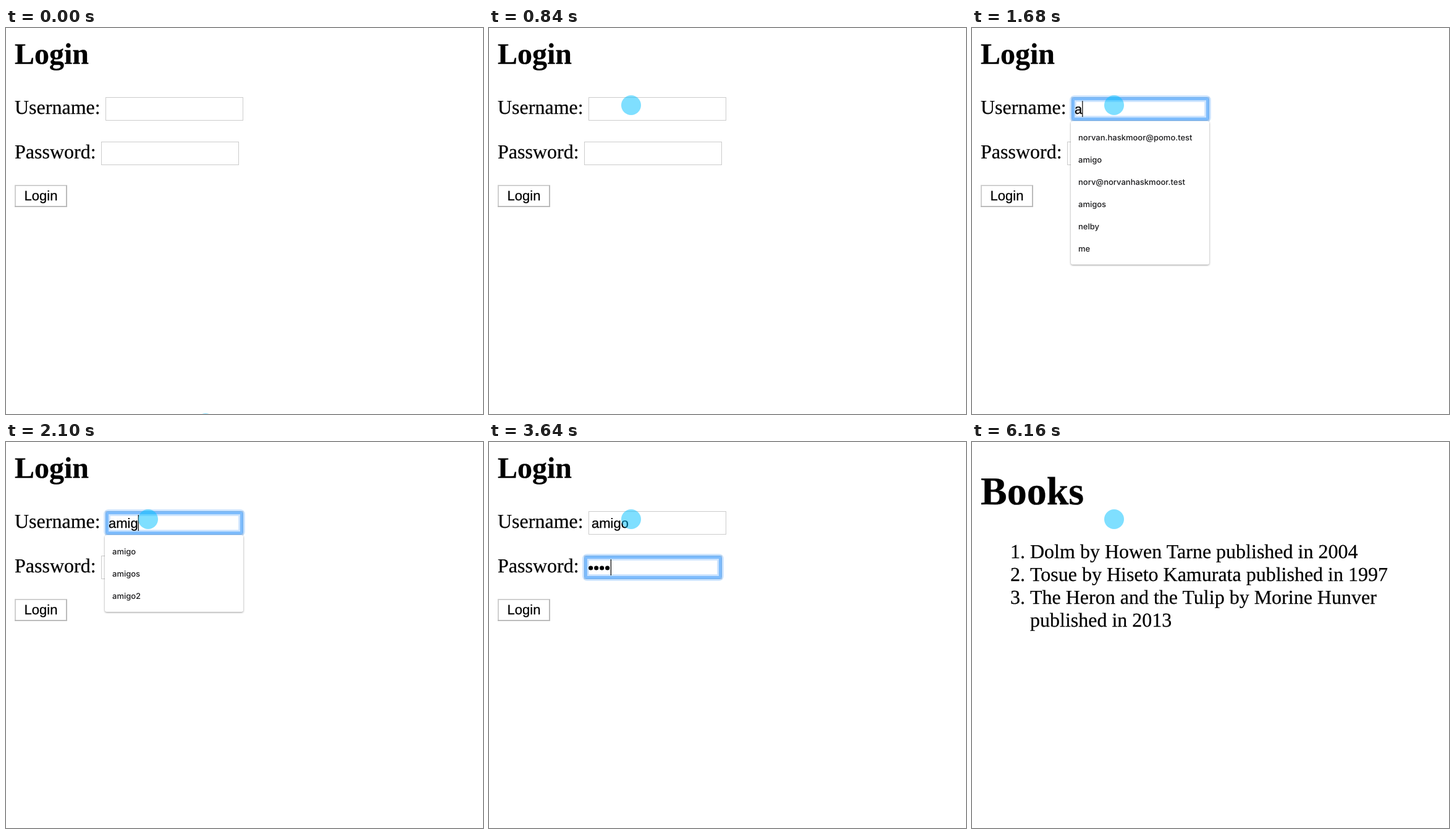
Write an HTML page that moves like this. It is 772 by 625 pixels and loops after 8 s.

```html
<!DOCTYPE html>
<html lang="en">
<head>
<meta charset="utf-8">
<title>Login</title>
<style>
  html, body { margin: 0; width: 100%; height: 100%; overflow: hidden; background: #fff; }
  svg { display: block; width: 772px; height: 625px; }
  text { white-space: pre; text-rendering: geometricPrecision; stroke: #000; stroke-width: .25px; }
  .serif { font: 32px "Liberation Serif", "Times New Roman", serif; }
  .bold { font-weight: 700; }
  .field { font: 22px "Liberation Sans", Arial, sans-serif; }
  .menu { font: 500 13px Inter, sans-serif; fill: #1c1c1e; stroke: none; }
  .input { fill: #fff; stroke: #ccc; }
  .ring rect { fill: none; stroke: #3b99fc; }
  #panel { fill: #fff; filter: drop-shadow(0 1px 1.5px rgba(0, 0, 0, .4)); }
</style>
</head>
<body>
<svg viewBox="0 0 772 625">
  <g id="login">
    <text class="serif bold" x="14" y="58" style="font-size:48px">Login</text>
    <text class="serif" x="14" y="139">Username:</text>
    <text class="serif" x="14" y="211">Password:</text>
    <rect class="input" x="161.5" y="112.5" width="222" height="37"/>
    <rect class="input" x="154.5" y="184.5" width="222" height="37"/>
    <rect x="15" y="255" width="83" height="34" fill="#fff" stroke="#d0d0d0" stroke-width="2"/>
    <path d="M14 289H99M98 255V290" stroke="#bbb" stroke-width="2"/>
    <text class="field" x="56.5" y="279" text-anchor="middle">Login</text>
    <g id="rings"></g>
    <text id="user" class="field" x="166" y="139"></text>
    <g id="dots"></g>
    <rect id="caret" width="1.2" height="26"/>
    <g id="menu">
      <rect id="panel" x="160" y="151" width="224" rx="3"/>
      <g id="items"></g>
    </g>
  </g>
  <g id="books">
    <text class="serif bold" x="14" y="101" style="font-size:64px">Books</text>
    <g id="list"></g>
  </g>
  <circle id="pointer" r="16" fill="#00bfff" fill-opacity=".5"/>
</svg>
<script>
const LOOP = 8000, STEP = 140;
const $ = id => document.getElementById(id);

function add(parent, tag, attrs, text = '') {
  const node = document.createElementNS('http://www.w3.org/2000/svg', tag);
  for (const key in attrs) node.setAttribute(key, attrs[key]);
  node.textContent = text;
  return parent.appendChild(node);
}
const show = (node, on) => { node.style.display = on ? '' : 'none'; };

// The last entry whose start time has passed.
const at = (table, t) => table.findLast(row => row[0] <= t)[1];

function makeRing(x, y, width, height) {
  const group = add($('rings'), 'g', { class: 'ring' });
  const box = { x, y, width, height, rx: 2 };
  add(group, 'rect', { ...box, 'stroke-width': 10.5, 'stroke-opacity': .27 });
  add(group, 'rect', { ...box, 'stroke-width': 5, 'stroke-opacity': .52 });
  return group;
}
const rings = {
  user: makeRing(163.5, 114.5, 218, 33),
  pass: makeRing(156.5, 186.5, 218, 33),
  button: makeRing(12.5, 252.5, 88, 39)
};

const dots = Array.from({ length: 7 }, (_, i) =>
  add($('dots'), 'circle', { cx: 164.7 + 9 * i, cy: 204, r: 3.6 }));

const allItems = ['norvan.haskmoor@pomo.test', 'amigo', 'norv@norvanhaskmoor.test', 'amigos', 'nelby', 'me'];
const matches = ['amigo', 'amigos', 'amigo2'];
let shownItems = null;

function setMenu(items) {
  if (items === shownItems) return;
  shownItems = items;
  show($('menu'), items.length);
  $('items').replaceChildren();
  items.forEach((label, i) =>
    add($('items'), 'text', { class: 'menu', x: 172, y: 182 + 36 * i }, label));
  $('panel').setAttribute('height', 16 + 36 * items.length);
}

const line = (x, row, text) =>
  add($('list'), 'text', { class: 'serif', x, y: 188 + 37 * row }, text);
[
  'Dolm by Howen Tarne published in 2004',
  'Tosue by Hiseto Kamurata published in 1997',
  'The Heron and the Tulip by Morine Hunver'
].forEach((text, i) => { line(62, i, `${i + 1}.`); line(94, i, text); });
line(94, 3, 'published in 2013');

const none = [];
const focusTimes = [[0, ''], [1120, 'user'], [2520, 'pass'], [4760, 'button']];
const menuTimes = [[0, none], [1400, allItems], [1820, matches], [2520, none]];
const typedTimes = [[0, 0], [1680, 1], [1820, 2], [1960, 3], [2100, 4], [2240, 5]];
const dotTimes = [[0, 0], [3220, 1], [3360, 2], [3500, 3], [3640, 4], [3780, 5], [3920, 6], [4200, 7]];
const travel = [0, .14, .38, .64, .85, .96, 1];

function draw(t) {
  const onBooks = t >= 6160;
  show($('login'), !onBooks);
  show($('books'), onBooks);

  const p = travel[Math.min(6, Math.floor(t / STEP))];
  $('pointer').setAttribute('cx', 323 - 93 * p);
  $('pointer').setAttribute('cy', 640 - 515 * p);
  if (onBooks) return;

  const focus = at(focusTimes, t);
  for (const name in rings) show(rings[name], name === focus);
  rings.user.style.opacity = t < 1260 ? .5 : 1;

  setMenu(at(menuTimes, t));
  $('user').textContent = 'amigo'.slice(0, at(typedTimes, t));
  const count = at(dotTimes, t);
  dots.forEach((dot, i) => show(dot, i < count));

  const inUser = focus === 'user';
  const blink = (t >= 1540 && t < 1680) || (t >= 3080 && t < 3220);
  show($('caret'), (inUser || focus === 'pass') && !blink);
  const typedWidth = inUser && $('user').textContent ? $('user').getComputedTextLength() : 0;
  $('caret').setAttribute('x', inUser ? 166 + typedWidth : 160 + 9.2 * count);
  $('caret').setAttribute('y', inUser ? 118 : 190);
}

const start = performance.now();
function tick() {
  draw((performance.now() - start) % LOOP);
  requestAnimationFrame(tick);
}
tick();
</script>
</body>
</html>
```
